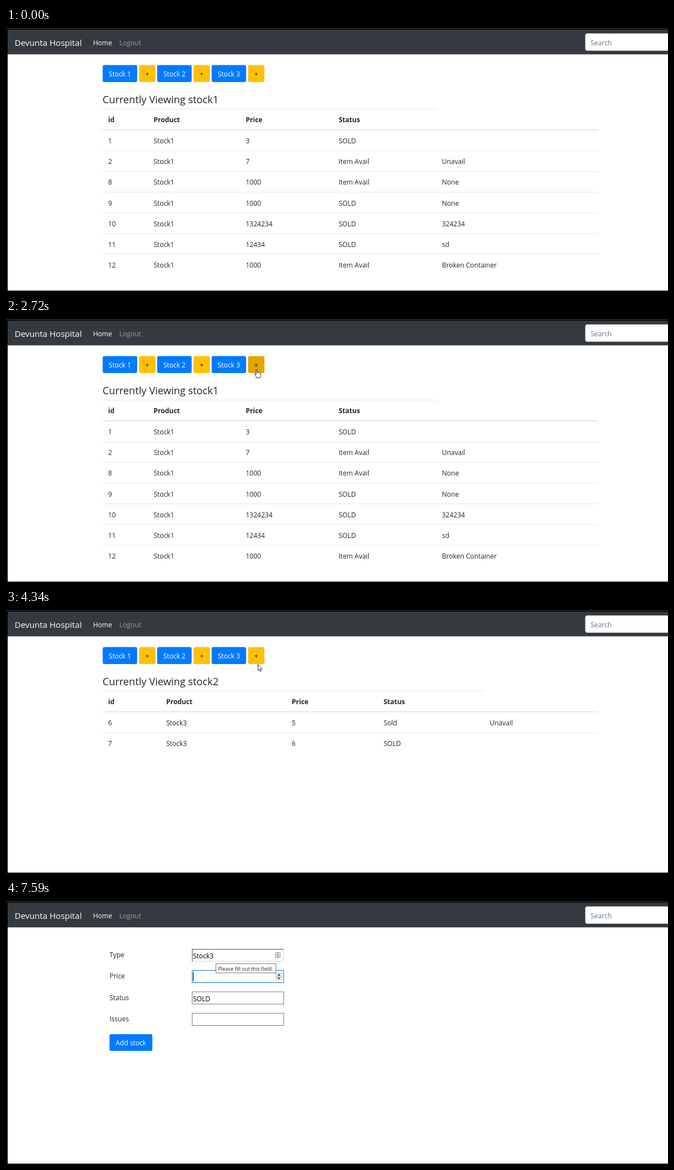
An HTML page that plays this animation: 1186 by 472 pixels, repeating every 8 s.

```html
<!DOCTYPE html>
<html lang="en">
<head>
<meta charset="utf-8">
<title>Hospital stock</title>
<style>
  html, body { margin: 0; width: 100%; height: 100%; overflow: hidden; background: #fff; }
  svg { display: block; width: 1186px; height: 472px; }
  text { font: 12px "Open Sans", "Noto Sans", sans-serif; fill: #212529; white-space: pre; }
  .bold { font-weight: 700; }
  .title { font-size: 18.2px; }
  .brand { font-size: 15px; }
  .light { fill: #fff; }
  .muted { fill: #9a9da0; }
  .hint { fill: #6c757d; }
  .mid { text-anchor: middle; }
  .input { fill: #000; }
  .tip { font-size: 9.2px; fill: #222; }
  .rule { fill: #dee2e6; }
  .field { fill: #fff; stroke: #7a7a7a; }
  .cursor { fill: #fff; stroke: #111; stroke-width: .9; stroke-linejoin: round; }
</style>
</head>
<body>
<svg id="stage" viewBox="0 0 1186 472"></svg>
<script>
const LOOP = 8000;
const HOVER_LAG = 75;
const ROW_TOP = 183, ROW_HEIGHT = 37.1;
const BUTTON_Y = 66.5, BUTTON_H = 30.5;
const FIELD_X = 333.5, FIELD_W = 164;

const text = (x, y, str, cls = '') => `<text x="${x}" y="${y}" class="${cls}">${str}</text>`;
const rect = (x, y, w, h, attrs = '') => `<rect x="${x}" y="${y}" width="${w}" height="${h}" ${attrs}/>`;
const group = (id, body) => `<g id="${id}">${body}</g>`;

const buttons = [1, 2, 3].flatMap((n, i) => {
  const x = 173.2 + i * 97.6;
  return [
    { x, w: 61.8, label: `Stock ${n}`, cls: 'mid light', fill: '#007bff', hover: '#0069d9' },
    { x: x + 65.2, w: 29.4, label: '+', cls: 'mid', fill: '#ffc107', hover: '#e0a800' },
  ];
});

const tables = [
  {
    id: 'tableA', title: 'stock1', columns: [183, 264.5, 429.5, 596, 781], headEnd: 771,
    rows: [
      ['1', 'Stock1', '3', 'SOLD', ''],
      ['2', 'Stock1', '7', 'Item Avail', 'Unavail'],
      ['8', 'Stock1', '1000', 'Item Avail', 'None'],
      ['9', 'Stock1', '1000', 'SOLD', 'None'],
      ['10', 'Stock1', '1324234', 'SOLD', '324234'],
      ['11', 'Stock1', '12434', 'SOLD', 'sd'],
      ['12', 'Stock1', '1000', 'Item Avail', 'Broken Container'],
    ],
  },
  {
    id: 'tableB', title: 'stock2', columns: [183, 287, 512, 676.5, 866.5], headEnd: 856,
    rows: [
      ['6', 'Stock3', '5', 'Sold', 'Unavail'],
      ['7', 'Stock3', '6', 'SOLD', ''],
    ],
  },
];

const fields = [['Type', 86.5], ['Price', 124.5], ['Status', 163], ['Issues', 201.5]];

function chrome() {
  return rect(0, 0, 1186, 3, 'fill="#000"') + rect(0, 0, 1186, 1.6, 'fill="#2b2d30"') +
    rect(0, 3, 3, 469, 'fill="#000"') +
    rect(3, 3, 1183, 44.3, 'fill="#343a40"') +
    rect(3, 471, 1183, 1, 'fill="#4a4244"') +
    text(15.5, 32, 'Devunta Hospital', 'brand light') +
    text(156, 31, 'Home', 'light') + text(203, 31, 'Logout', 'muted') +
    rect(1038, 10, 160, 30.5, 'rx="3.2" fill="#fff" stroke="#ced4da" stroke-width=".8"') +
    text(1047.5, 31, 'Search', 'hint');
}

function buttonBar() {
  return buttons.map(b =>
    rect(b.x, BUTTON_Y, b.w, BUTTON_H, `rx="3.2" fill="${b.fill}" class="button"`) +
    text(b.x + b.w / 2, 87, b.label, b.cls)).join('');
}

function table({ id, title, columns, headEnd, rows }) {
  const heads = ['id', 'Product', 'Price', 'Status'];
  const body = rows.map((row, i) => {
    const top = ROW_TOP + i * ROW_HEIGHT;
    return (i ? rect(173, top - .1, 888, .9, 'class="rule"') : '') +
      row.map((cell, c) => cell && text(columns[c], top + 24.2, cell)).join('');
  }).join('');
  return group(id,
    text(173, 135, `Currently Viewing ${title}`, 'title') +
    rect(173, 145, headEnd - 173, .9, 'class="rule"') +
    heads.map((h, c) => text(columns[c], 169.3, h, 'bold')).join('') +
    rect(173, 181.8, 888, 1.6, 'class="rule"') + body);
}

function form() {
  const rows = fields.map(([label, y]) =>
    text(185.5, y + 14.8, label) +
    rect(FIELD_X, y, FIELD_W, 22, `class="field" id="box${label}"`)).join('');
  const inset = group('inset',
    rect(333, 86, 165, 23, 'fill="#e3e3e3"') +
    '<path d="M333 109V86H498L496.4 87.6H334.6V107.4Z" fill="#767676"/>' +
    rect(334.6, 87.6, 161.8, 19.8, 'fill="#fff"') +
    rect(482.7, 92.5, 8.4, 9.2, 'rx="1" fill="#eee" stroke="#888"') +
    rect(485.6, 94.5, 2.6, 2.6, 'fill="#888"') + rect(484.8, 98.2, 4.2, 1.4, 'fill="#888"'));
  const spinner = group('spinner',
    rect(483.5, 129.5, 11, 5.5, 'fill="#f0f0f0" stroke="#b5b5b5" stroke-width=".8"') +
    rect(483.5, 136, 11, 5.5, 'fill="#f0f0f0" stroke="#b5b5b5" stroke-width=".8"') +
    '<path d="M486.5 133.8l2.5-3 2.5 3zM486.5 137.4l2.5 3 2.5-3z" fill="#222"/>');
  const tip = group('tip',
    rect(376, 112.5, 107.5, 16.5, 'fill="#fff" stroke="#767676"') +
    text(380, 124.5, 'Please fill out this field.', 'tip'));
  return group('form', rows + inset + spinner +
    '<text id="typed" x="335" y="102.5" class="input"></text>' +
    text(335, 179.5, 'SOLD', 'input') +
    rect(0, 0, 1, 16, 'id="caret" fill="#000"') +
    rect(185.4, 239, 76.8, 30, 'rx="3.2" fill="#007bff"') +
    text(223.8, 259.4, 'Add stock', 'mid light') + tip);
}

const pointers =
  '<g id="pointer">' +
  '<path id="arrow" class="cursor" d="M.5.5V11.6L3 9.3 4.7 13 6.4 12.2 4.8 8.6H8.2Z"/>' +
  '<path id="hand" class="cursor" d="M-1 .8C-1-.4 1-.4 1 .8V5.2C1.6 4.4 3 4.6 3.2 5.6 4 5 5.2 5.3 5.3 6.2 6.4 5.8 7.3 6.4 7.3 7.4V10.5C7.3 12 6.3 12.8 6.3 14.6H.3C.3 13-3 9.8-3.4 8.4-3.5 7.2-2 7-1 8.6Z"/>' +
  '<path id="beam" d="M-2-6.5H2M0-6.5V6.5M-2 6.5H2" stroke="#111" fill="none"/>' +
  '</g>';

const stage = document.getElementById('stage');
stage.innerHTML = rect(0, 0, 1186, 472, 'fill="#fff"') + chrome() +
  rect(173, 0, 888, ROW_HEIGHT, 'id="rowHover" fill="#ececec"') +
  group('bar', rect(0, BUTTON_Y - .8, 0, BUTTON_H + 1.6, 'id="ring" rx="4" fill="none" stroke-width="1.6"') + buttonBar()) +
  tables.map(table).join('') + form() + pointers;

const $ = id => document.getElementById(id);
const show = (id, on) => $(id).setAttribute('visibility', on ? 'inherit' : 'hidden');
const setAttrs = (el, attrs) => Object.entries(attrs).forEach(([k, v]) => el.setAttribute(k, v));
const buttonRects = [...document.querySelectorAll('.button')];

// time, x, y of the pointer tip
const path = [
  [750, 328, 288], [870, 334, 268], [1000, 334, 268], [1440, 366, 264], [1620, 366, 264],
  [1670, 367, 248.5], [1740, 367, 248.5], [2000, 412, 158], [2220, 445, 98], [2340, 449, 91],
  [2720, 449, 91], [2770, 449, 91], [2930, 402, 86], [3160, 402, 86], [3430, 472, 198],
  [3500, 475, 206], [3570, 475, 206], [3580, 475.5, 203.5], [4030, 475.5, 203.5],
  [4330, 451, 98], [4460, 449, 90], [4860, 449, 90], [5140, 509, 212.5], [5350, 509, 212.5],
  [5520, 450, 155], [5700, 380, 100], [5800, 376, 97],
];
// clicked page stays frozen while the next one loads
const freezes = [[2990, 3160], [4810, 5350]];
const keyTimes = [6290, 6390, 6580, 6670, 6760, 6930];
const PAGE_B = 3160, PAGE_FORM = 5210, ICON_AT = 5350;
const TYPE_FOCUS = 5800, PRICE_FOCUS = 7220, TIP_AT = 7590;

function pointerAt(t) {
  const next = path.findIndex(p => p[0] > t);
  if (next === 0) return path[0].slice(1);
  if (next < 0) return path[path.length - 1].slice(1);
  const [t0, x0, y0] = path[next - 1], [t1, x1, y1] = path[next];
  const k = (t - t0) / (t1 - t0);
  return [x0 + (x1 - x0) * k, y0 + (y1 - y0) * k];
}

const inBar = y => y >= BUTTON_Y && y <= BUTTON_Y + BUTTON_H;

function render(t) {
  const onForm = t >= PAGE_FORM, onB = t >= PAGE_B && !onForm;
  const freeze = freezes.find(([a, b]) => t >= a && t < b);
  const [hx, hy] = pointerAt(freeze ? freeze[0] : t - HOVER_LAG);
  const [x, y] = pointerAt(t);
  const visible = t >= 750 && t < keyTimes[0];

  show('tableA', t < PAGE_B);
  show('tableB', onB);
  show('bar', !onForm);
  show('form', onForm);

  const over = visible && inBar(hy) ? buttons.findIndex(b => hx >= b.x && hx <= b.x + b.w) : -1;
  buttons.forEach((b, i) => buttonRects[i].setAttribute('fill', i === over ? b.hover : b.fill));
  const focused = freeze && !onForm ? buttons[over] : null;
  show('ring', !!focused);
  if (focused) setAttrs($('ring'), { x: focused.x - .8, width: focused.w + 1.6, stroke: focused.fill, 'stroke-opacity': .5 });

  const rowCount = tables[onB ? 1 : 0].rows.length;
  const row = Math.floor((hy - ROW_TOP) / ROW_HEIGHT);
  show('rowHover', visible && !onForm && row >= 0 && row < rowCount);
  $('rowHover').setAttribute('y', ROW_TOP + row * ROW_HEIGHT);

  show('pointer', visible);
  $('pointer').setAttribute('transform', `translate(${x} ${y})`);
  const overField = onForm && !freeze && x > FIELD_X && x < FIELD_X + FIELD_W &&
    fields.some(f => y >= f[1] && y <= f[1] + 22);
  const shape = over >= 0 ? 'hand' : overField ? 'beam' : 'arrow';
  ['arrow', 'hand', 'beam'].forEach(id => show(id, visible && id === shape));

  const onPrice = t >= PRICE_FOCUS;
  const typed = $('typed');
  typed.textContent = 'Stock3'.slice(0, keyTimes.filter(k => k <= t).length);
  show('inset', t >= ICON_AT);
  show('spinner', onPrice);
  $('boxPrice').style.stroke = onPrice ? '#0078d7' : '';
  show('caret', t >= TYPE_FOCUS);
  setAttrs($('caret'), onPrice ? { x: 335, y: 127.5 } : { x: 335 + typed.getComputedTextLength(), y: 89.5 });
  show('tip', t >= TIP_AT);
}

function tick() {
  render(performance.now() % LOOP);
  requestAnimationFrame(tick);
}
tick();
</script>
</body>
</html>
```
